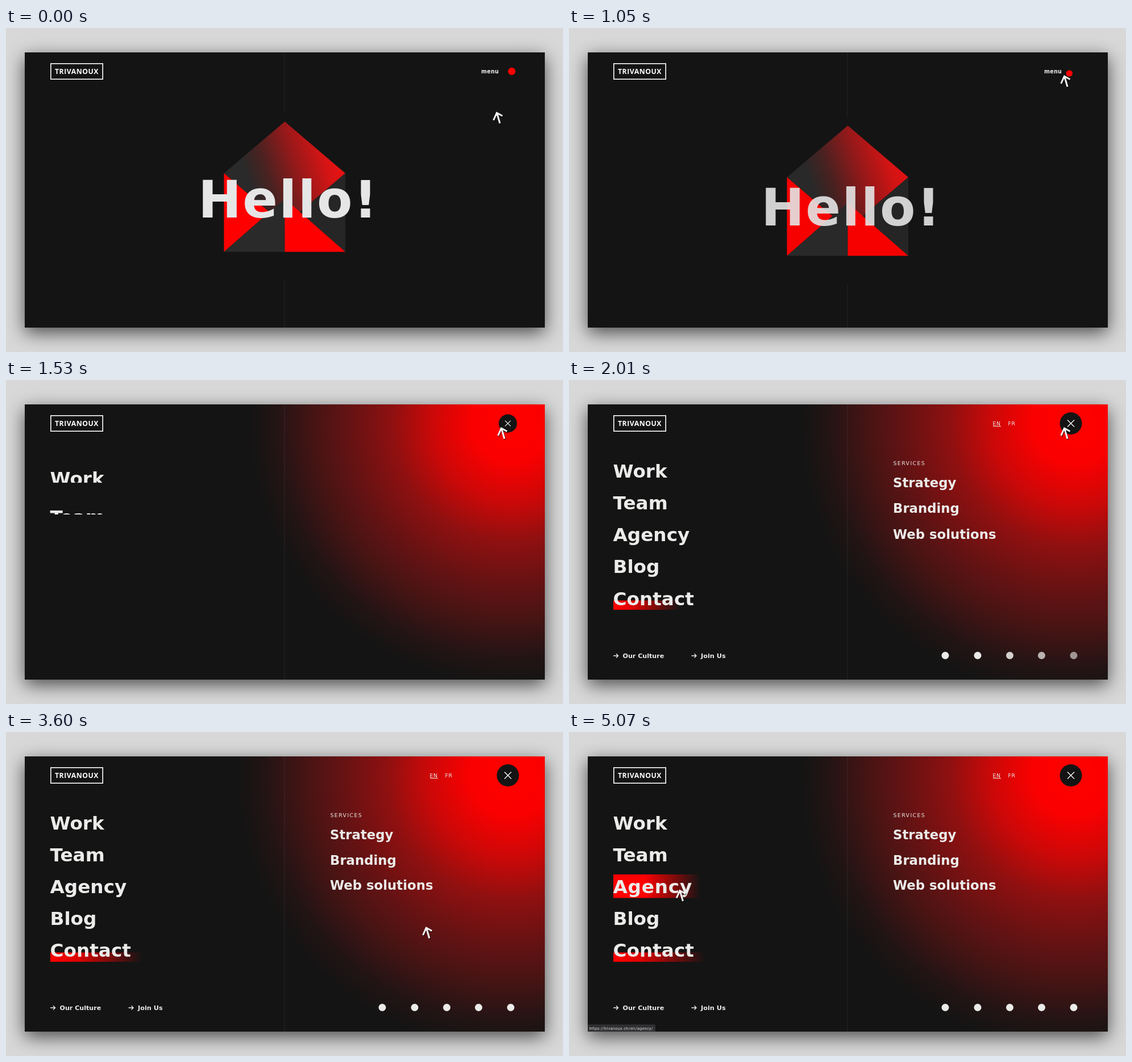
Recreate the animation shown at these times as an HTML page. Size 980 px wide and 571 px high, loop 5.1 s.

```html
<!DOCTYPE html>
<html lang="en">
<head>
<meta charset="utf-8">
<title>Agency menu</title>
<style>
  html, body { margin: 0; width: 100%; height: 100%; overflow: hidden; background: #d8d8d8; }
  .stage { position: relative; width: 980px; height: 571px; overflow: hidden; }
  .panel { position: absolute; left: 33px; top: 43px; width: 915px; height: 485px;
    background: #141414; box-shadow: 0 9px 30px rgba(0, 0, 0, .66); }
  svg { position: absolute; left: 0; top: 0; display: block; }
  text { font-family: "DejaVu Sans", sans-serif; fill: #ebebe9; }
  .bold { font-weight: 700; }
  .logo { font: 700 12.3px "Open Sans", sans-serif; letter-spacing: .5px; fill: #fff; }
  .small { font-size: 9.4px; }
  .url { font: 7.4px Roboto, sans-serif; fill: #d4d4d4; }
</style>
</head>
<body>
<div class="stage">
  <div class="panel"></div>
  <svg width="980" height="571" viewBox="0 0 980 571">
    <defs>
      <clipPath id="frame"><rect x="33" y="43" width="915" height="485"/></clipPath>
      <linearGradient id="flapFill" gradientUnits="userSpaceOnUse" x1="425" y1="262" x2="590" y2="205">
        <stop offset="0" stop-color="#2a2a2a"/>
        <stop offset=".2" stop-color="#4a2221"/>
        <stop offset=".5" stop-color="#96191a"/>
        <stop offset=".8" stop-color="#d91414"/>
        <stop offset="1" stop-color="#f01010"/>
      </linearGradient>
      <radialGradient id="glowFill">
        <stop offset="0" stop-color="#f00"/>
        <stop offset=".15" stop-color="#fa0000"/>
        <stop offset=".3" stop-color="#cc0808"/>
        <stop offset=".45" stop-color="#901010"/>
        <stop offset=".6" stop-color="#691213"/>
        <stop offset=".75" stop-color="#471414"/>
        <stop offset=".9" stop-color="#221414"/>
        <stop offset="1" stop-color="#141414"/>
      </radialGradient>
      <linearGradient id="barFill">
        <stop offset="0" stop-color="#f00"/>
        <stop offset=".3" stop-color="#f00" stop-opacity=".85"/>
        <stop offset="1" stop-color="#f00" stop-opacity="0"/>
      </linearGradient>
      <linearGradient id="hoverFill">
        <stop offset=".35" stop-color="#f00"/>
        <stop offset="1" stop-color="#f00" stop-opacity="0"/>
      </linearGradient>
    </defs>

    <g clip-path="url(#frame)">
      <circle id="glow" cx="889" cy="76" r="0" fill="url(#glowFill)"/>
      <path id="divider" stroke="#fff" stroke-opacity=".075"/>

      <g id="envelope">
        <path d="M490.500 165 597 256 490.500 347 383.500 256Z" fill="url(#flapFill)"/>
        <path d="M383.500 394.500V256L463.500 324.500Z" fill="#f00"/>
        <path d="M597 256V394.500L517.500 324.500Z" fill="#262626"/>
        <path d="M383.500 394.500 490.500 301V394.500Z" fill="#2a2a2a"/>
        <path d="M490.500 301 597 394.500H490.500Z" fill="#f00"/>
      </g>
      <text id="hello" class="bold" x="338" y="334" font-size="91" letter-spacing="2.200" style="fill:#e6e6e6">Hello!</text>

      <rect x="78.800" y="62.800" width="91.400" height="27.400" fill="none" stroke="#fff" stroke-width="1.600"/>
      <text class="logo" x="124.500" y="80.800" text-anchor="middle">TRIVANOUX</text>

      <g id="toggle">
        <text class="bold" x="836" y="79.800" font-size="9.600" letter-spacing=".2">menu</text>
        <circle id="dot" r="6.500" fill="#f00"/>
      </g>

      <g id="close">
        <circle r="19.500" fill="#141414"/>
        <path d="M-6 -6 6 6M6 -6-6 6" stroke="#fff" stroke-width="1.300"/>
      </g>

      <g id="langs">
        <text class="small" x="745.500" y="79.500" letter-spacing=".6">EN</text>
        <text class="small" x="772.500" y="79.500" letter-spacing=".6">FR</text>
        <path d="M746 81.500H760" stroke="#ebebe9"/>
      </g>
      <text id="heading" class="small" x="570.500" y="149.500" letter-spacing="1.400">SERVICES</text>

      <rect id="bar" y="388.500" x="78" height="16.500" fill="url(#barFill)"/>
      <rect id="hover" y="251" x="78" height="41.500" fill="url(#hoverFill)"/>
      <g id="items"></g>

      <g id="links">
        <path id="arrows" d="M78 486H86.500M83 482.500 86.500 486 83 489.500M215.500 486H224M220.500 482.500 224 486 220.500 489.500"
          fill="none" stroke="#ebebe9" stroke-width="1.400"/>
        <text class="bold" x="94.500" y="490" font-size="11.100">Our Culture</text>
        <text class="bold" x="232" y="490" font-size="11.300">Join Us</text>
      </g>
      <g id="socials" fill="#ebebe9"></g>

      <g id="status">
        <rect x="33" y="515.500" width="119" height="12.500" fill="#303032"/>
        <text class="url" x="35.500" y="524.500" letter-spacing=".25">https://trivanoux.ch/en/agency/</text>
      </g>
    </g>

    <g id="cursor" fill="none">
      <path d="M1 2.500 6.500 20.500M-5 15 .5 2 11 7.500" stroke="#000" stroke-opacity=".45" stroke-width="4" transform="translate(.6 1)"/>
      <path d="M.8 2 6 20M-5.300 14.500 .5 1.500 10.500 7" stroke="#f4f4f4" stroke-width="3"/>
    </g>
  </svg>
</div>

<script>
const LOOP = 5100;
const $ = id => document.getElementById(id);
const NS = "http://www.w3.org/2000/svg";

const clamp = v => Math.min(1, Math.max(0, v));
const part = (t, start, length) => clamp((t - start) / length);
const mix = (a, b, p) => a + (b - a) * p;
const smooth = p => p * p * (3 - 2 * p);
const cubicOut = p => 1 - (1 - p) ** 3;
const expoOut = p => p >= 1 ? 1 : 1 - 2 ** (-10 * p);

function add(parent, tag, attrs, text) {
  const el = document.createElementNS(NS, tag);
  for (const key in attrs) el.setAttribute(key, attrs[key]);
  if (text) el.textContent = text;
  parent.append(el);
  return el;
}
const set = (id, name, value) => $(id).setAttribute(name, value);
const fade = (id, value) => set(id, "opacity", clamp(value));
const move = (id, x, y, rest = "") => set(id, "transform", `translate(${x} ${y}) ${rest}`);

// Text lines that slide up inside a clip box
const items = [];
function addList(words, { x, y, pitch, size, rise, drop, start, stagger }) {
  words.forEach((word, i) => {
    const base = y + i * pitch;
    const id = "clip" + items.length;
    const clip = add($("items"), "clipPath", { id });
    add(clip, "rect", { x: 33, y: base - rise, width: 915, height: rise + drop });
    const box = add($("items"), "g", { "clip-path": `url(#${id})` });
    const el = add(box, "text", { x, y: base, "font-size": size, class: "bold" }, word);
    items.push({ el, start: start + i * stagger, height: rise + drop });
  });
}
addList(["Work", "Team", "Agency", "Blog", "Contact"],
  { x: 77.5, y: 171.5, pitch: 56.2, size: 32.7, rise: 32, drop: 9.4, start: 1432, stagger: 58 });
addList(["Strategy", "Branding", "Web solutions"],
  { x: 570, y: 188.8, pitch: 44.7, size: 22.8, rise: 23, drop: 7, start: 1650, stagger: 63 });

const socials = [662, 719, 775.5, 831.5, 888].map(cx =>
  add($("socials"), "circle", { cx, cy: 485.5, r: 6.5 }));

// Pointer stops: time, x, y
const stops = [
  [0, 863, 148], [850, 871, 83.5], [2350, 871, 83.5], [3000, 785.5, 296], [3600, 739, 343.5],
  [4200, 480, 340], [4700, 215, 290], [4950, 194.5, 278], [LOOP, 194.5, 278]
];

// Monotone cubic curve through the stops
function along(t, axis) {
  const last = stops.length - 2;
  const slope = i => i < 0 || i > last ? 0 :
    (stops[i + 1][axis] - stops[i][axis]) / (stops[i + 1][0] - stops[i][0]);
  const tangent = i => {
    const a = slope(i - 1), b = slope(i);
    return a * b > 0 ? 2 * a * b / (a + b) : 0;
  };
  let i = 0;
  while (i < last && t >= stops[i + 1][0]) i++;
  const span = stops[i + 1][0] - stops[i][0];
  const p = (t - stops[i][0]) / span, q = 1 - p;
  return stops[i][axis] * (1 + 2 * p) * q * q + stops[i + 1][axis] * p * p * (3 - 2 * p)
    + span * (tangent(i) * p * q * q - tangent(i + 1) * p * p * q);
}

function drawHome(t) {
  const u = Math.max(0, (t - 750) / 300);
  const shift = 7 * Math.min(u, 2) ** 2;
  move("envelope", 0, shift);
  fade("envelope", 1 - .03 * u ** 6);
  move("hello", 0, shift * 2);
  fade("hello", 1 - .1 * u ** 4);

  const join = smooth(part(t, 1080, 400));
  const top = mix(150 + shift, 290, join);
  const bottom = mix(444 + shift, 290, join);
  set("divider", "d", `M490 43V${top}M490 ${bottom}V528`);

  const pull = smooth(part(t, 100, 900));
  move("dot", mix(889.8, 880.3, pull), mix(76.3, 80, pull), `scale(${mix(1, .88, pull)})`);
  fade("toggle", 1 - part(t, 1080, 180));
}

function drawMenu(t) {
  set("glow", "r", 484 * cubicOut(part(t, 1080, 700)));
  move("close", 883, 76.5, `scale(${cubicOut(part(t, 1250, 640))})`);
  fade("langs", part(t, 1600, 350));
  fade("heading", part(t, 1600, 350));
  fade("links", part(t, 1650, 330));
  for (const { el, start, height } of items) {
    const left = 1 - expoOut(part(t, start, 600));
    el.setAttribute("transform", `translate(0 ${left * height})`);
  }
  socials.forEach((el, i) => el.setAttribute("opacity", part(t, 1550 + i * 55, 400)));
  set("bar", "width", 162 * cubicOut(part(t, 1800, 600)));
}

function drawHover(t) {
  const p = expoOut(part(t, 4650, 400));
  set("hover", "width", 154 * p);
  items[2].el.setAttribute("letter-spacing", .8 * p);
  fade("status", part(t, 4720, 180));
}

function draw(t) {
  drawHome(t);
  drawMenu(t);
  drawHover(t);
  move("cursor", along(t, 1), along(t, 2));
}

const began = performance.now();
function tick() {
  draw((performance.now() - began) % LOOP);
  requestAnimationFrame(tick);
}
tick();
</script>
</body>
</html>
```
